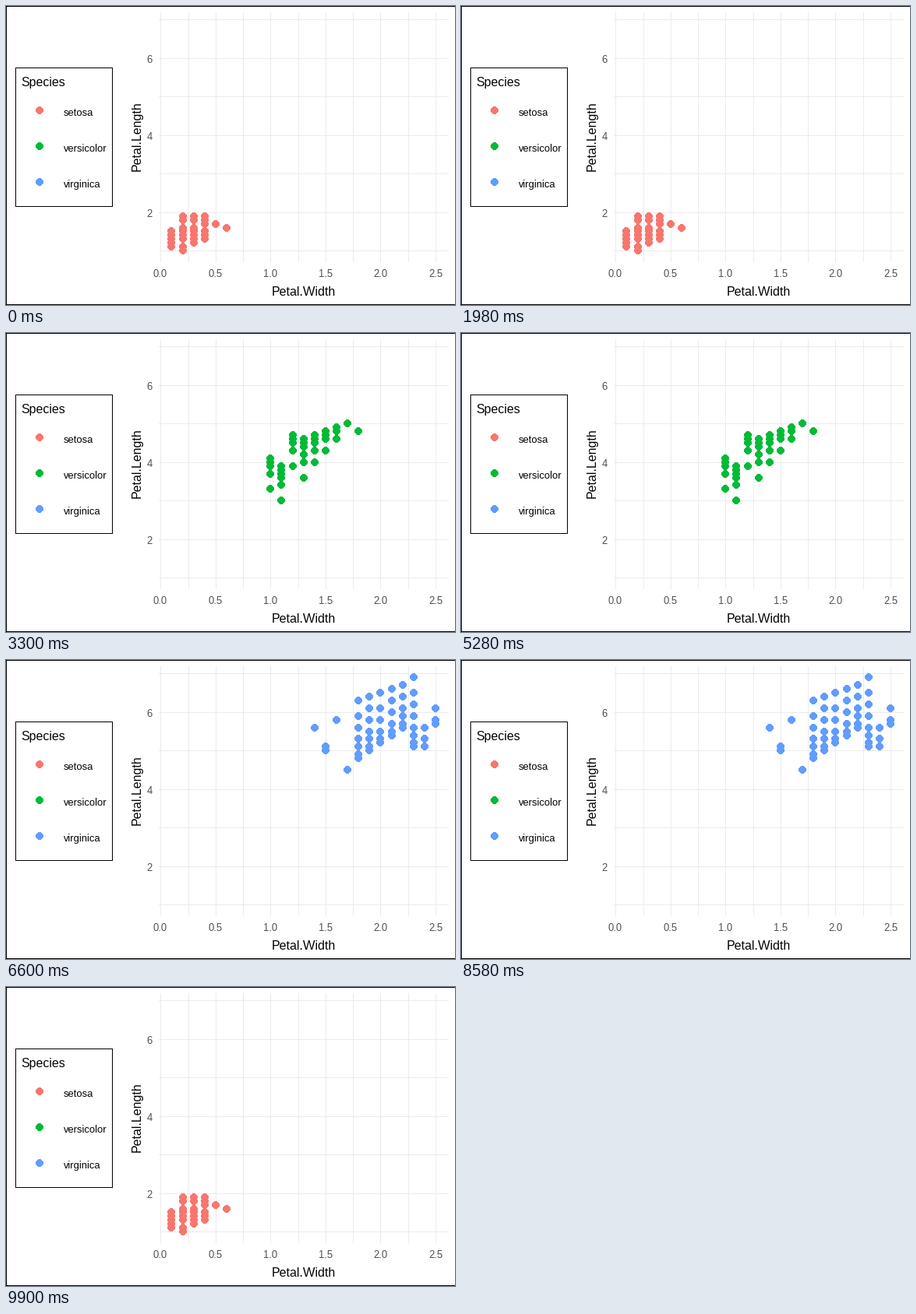
These frames come from a looping animation (576 px wide and 384 px high, 10 s). A matplotlib script:

```python
import math

import matplotlib.pyplot as plt
import numpy as np
from matplotlib.animation import FuncAnimation
from matplotlib.collections import PatchCollection
from matplotlib.patches import Polygon, Rectangle

W, H, DPI = 576, 384, 100
PX = 72 / DPI  # one pixel in points
FRAMES, INTERVAL, HOLD = 100, 100, 33
GREY, GRID = "#4D4D4D", "#EBEBEB"

plt.rcParams.update({
    "font.family": "Liberation Sans",
    "text.hinting": "native",
})

# Name, colour, spacing, skew and the outline of each cluster as
# (petal width, shortest, longest) in mm
SPECIES = [
    ("setosa", "#F8766D", 1.3, 1.0,
     [(1, 11, 15), (2, 10, 19), (4, 13, 19), (5, 17, 17), (6, 16, 16)]),
    ("versicolor", "#00BA38", 2.0, 0.5,
     [(10, 33, 41), (11, 30, 39), (12, 39, 47), (13, 36, 46),
      (17, 50, 50), (18, 48, 48)]),
    ("virginica", "#619CFF", 2.6, 1.5,
     [(14, 56, 56), (15, 50, 51), (16, 58, 58), (17, 45, 45), (18, 48, 63),
      (22, 56, 67), (23, 51, 69), (24, 51, 56), (25, 57, 61)]),
]


def x_px(width):
    return round(198.3 + 141.05 * width)


def y_px(length):
    return round(363.7 - 49.48 * length)


def cluster(outline, step, skew):
    """Fill the outline column by column, denser towards one end."""
    keys, lows, highs = zip(*outline)
    for w in range(keys[0], keys[-1] + 1):
        low, high = np.interp(w, keys, lows), np.interp(w, keys, highs)
        count = math.ceil((high - low) / step) + 1
        for t in np.linspace(0, 1, count):
            length = np.rint(low + (high - low) * t ** skew)
            yield x_px(w / 10), y_px(length / 10)


def disc_outline(radius=4.85):
    """Corners of a hard-edged disc ten pixels wide."""
    right = []
    for row in range(-5, 5):
        half = round(math.sqrt(radius ** 2 - (row + 0.5) ** 2))
        right += [(half, row), (half, row + 1)]
    return np.array(right + [(-x, y) for x, y in reversed(right)])


DISC = disc_outline()

fig = plt.figure(figsize=(W / DPI, H / DPI), dpi=DPI, facecolor="white")
ax = fig.add_axes([0, 0, 1, 1])
ax.set(xlim=(0, W), ylim=(H, 0))
ax.axis("off")


def bar(x, y, width, height, color):
    ax.add_patch(Rectangle((x, y), width, height, fc=color, lw=0, snap=True))


def frame_box(left, top, right, bottom):
    for y in (top, bottom):
        bar(left, y, right - left + 1, 1, "black")
    for x in (left, right):
        bar(x, top, 1, bottom - top + 1, "black")


def label(x, y, text, size=13, color="black", ha="left", **kw):
    ax.text(x, y, text, fontsize=size * PX, color=color, ha=ha,
            va="baseline", **kw)


def dots(centres, color):
    discs = PatchCollection([Polygon(DISC + c) for c in centres],
                            facecolor=color, edgecolor="none", linewidth=0,
                            zorder=3)
    discs.set_snap(True)
    return ax.add_collection(discs)


# Grid
for i in range(11):
    bar(x_px(i / 4), 8, 1, 321, GRID)
for i in range(1, 8):
    bar(196, y_px(i), 372, 1, GRID)

# Axes text
for i in range(6):
    label(x_px(i / 2), 348, f"{i / 2:.1f}", color=GREY, ha="center")
for i in (2, 4, 6):
    label(188, y_px(i) + 6, str(i), color=GREY, ha="right")
label(382, 372, "Petal.Width", 16, ha="center")
label(173, 167.5, "Petal.Length", 16, ha="center", rotation=90,
      rotation_mode="anchor")

# The outer border runs off the right edge
frame_box(0, 0, W, H - 1)
frame_box(12, 79, 136, 257)
label(19.5, 103, "Species", 16)

layers = []
for i, (name, color, step, skew, outline) in enumerate(SPECIES):
    dots([(43, 134 + 46 * i)], color)
    label(74, 141 + 46 * i, name)
    layers.append(dots(cluster(outline, step, skew), color))


def update(frame):
    current = frame // HOLD % len(layers)
    for i, layer in enumerate(layers):
        layer.set_visible(i == current)
    return layers


anim = FuncAnimation(fig, update, frames=FRAMES, interval=INTERVAL,
                     init_func=lambda: update(0), repeat=True, repeat_delay=0)
plt.show()
```
